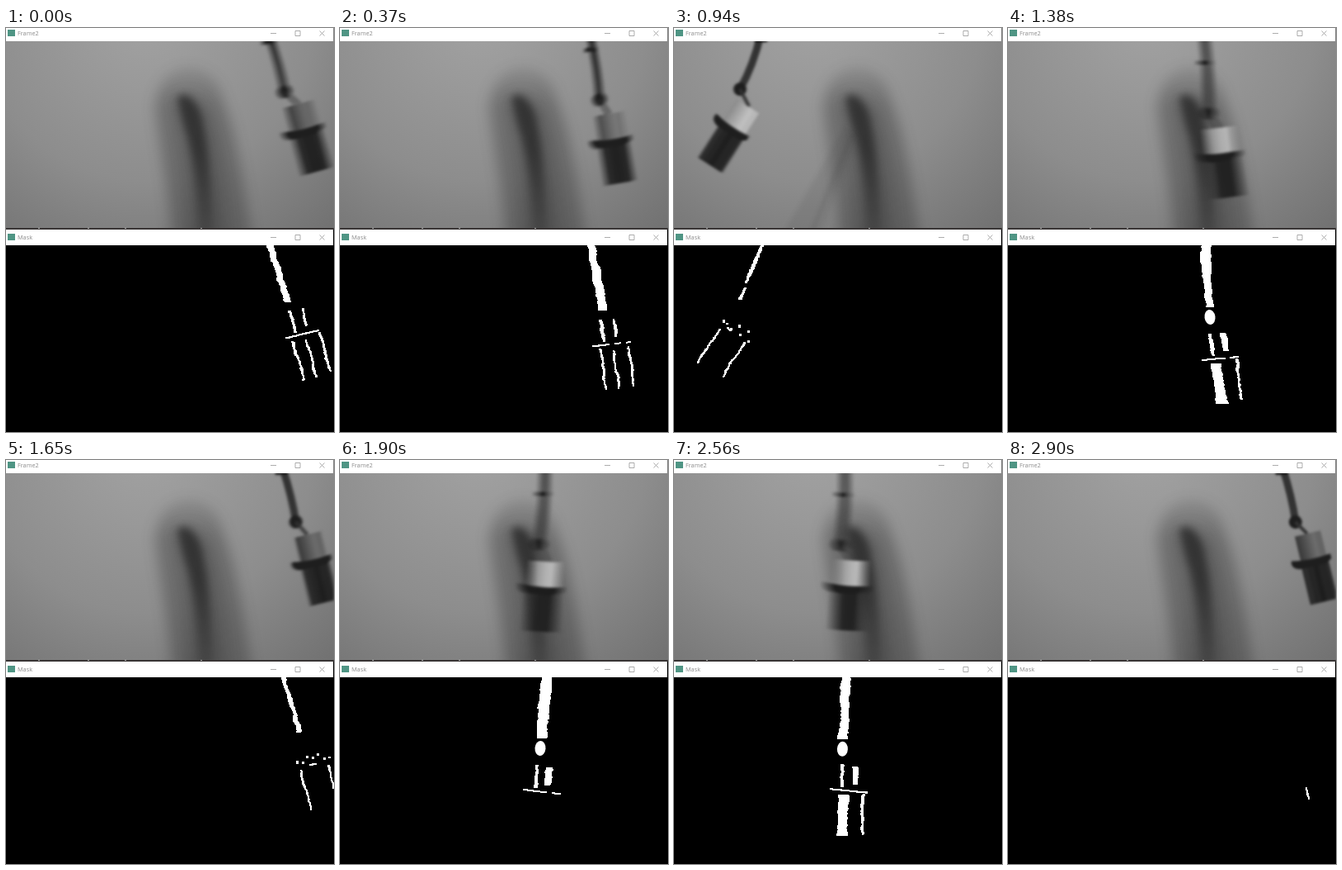
Animation, 398 px wide and 489 px high, one loop 2960 ms. Source, as an HTML page with a canvas:

```html
<!DOCTYPE html>
<html lang="en">
<head>
<meta charset="utf-8">
<title>Pendulum mask</title>
<style>
html, body { margin: 0; width: 398px; height: 489px; overflow: hidden; background: #000; }
canvas { position: absolute; left: 0; top: 0; }
.bar { position: absolute; left: 0; width: 397px; height: 16px; background: #fff; color: #8c8c8c;
  font: 7.3px/13px "Open Sans", "Noto Sans", sans-serif; }
.bar span { position: absolute; left: 14px; top: 0; }
.bar i { position: absolute; left: 2px; top: 2px; width: 9px; height: 8px; background: #4f9584; }
.bar svg { position: absolute; left: 318px; top: 0; fill: none; stroke: #999; stroke-width: .8; }
#lower { top: 244px; height: 19px; line-height: 19px; }
#lower i { top: 5px; }
#lower svg { top: 3px; }
</style>
</head>
<body>
<canvas id="stage" width="398" height="489"></canvas>
<div class="bar"><i></i><span>Frame2</span>
  <svg width="80" height="14"><path d="M3 6.5h7M33 3.5h6v6h-6zM62.5 3.5l6 6m0-6l-6 6"/></svg></div>
<div class="bar" id="lower"><i></i><span>Mask</span>
  <svg width="80" height="14"><path d="M3 6.5h7M33 3.5h6v6h-6zM62.5 3.5l6 6m0-6l-6 6"/></svg></div>
<script>
const W = 398, H = 489, LOOP = 2960, TOP = 16, BASE = 242, DROP = 247, MASK = 263;
const ctx = document.getElementById('stage').getContext('2d');
const layer = () => Object.assign(document.createElement('canvas'), { width: W, height: BASE }).getContext('2d');
const wall = layer(), sharp = layer(), smear = layer();
const clamp = (v, lo = 0, hi = 1) => Math.min(hi, Math.max(lo, v));

// Picture changes: [first, last, count], evenly spaced
const steps = [[0, 0, 1], [30, 540, 7], [600, 670, 2], [730, 940, 4], [1010, 1080, 2], [1140, 1380, 5],
  [1440, 1650, 5], [1710, 1900, 5], [1960, 2220, 6], [2280, 2760, 8], [2830, 2900, 2]]
  .flatMap(([a, b, n]) => Array.from({ length: n }, (_, i) => n > 1 ? a + (b - a) * i / (n - 1) : a));

// time, rod top x, knob x, knob y, body x, body y, tilt in degrees
const keys = [
  [-250, 225, 225, 104, 236, 119, 1],
  [0, 319, 338, 77, 354, 89, 15.5],
  [210, 335, 357, 74, 371, 86, 16],
  [540, 250, 246, 102, 254, 119, -2],
  [670, 196, 181, 103, 190, 120, -16.8],
  [940, 105, 80, 74, 91, 92, -32.5],
  [1380, 238, 243, 103, 255, 118, 8],
  [1620, 336, 354, 74, 368, 86, 15],
  [1900, 249, 241, 102, 250, 120, -4.5],
  [2280, 113, 92, 74, 104, 94, -32],
  [2590, 225, 223, 104, 236, 119, 1],
  [2900, 333, 349, 75, 363, 86, 13.6],
  [3220, 225, 223, 104, 236, 119, 1]
];

function slope(i, c) {
  const a = keys[Math.max(0, i - 1)], b = keys[Math.min(keys.length - 1, i + 1)];
  return 1.35 * (b[c] - a[c]) / (b[0] - a[0]);
}

function pose(t) {
  let i = 0;
  while (i < keys.length - 2 && t >= keys[i + 1][0]) i++;
  const p = keys[i], q = keys[i + 1], d = q[0] - p[0], k = (t - p[0]) / d, k2 = k * k, k3 = k2 * k;
  const at = c => (2 * k3 - 3 * k2 + 1) * p[c] + (k3 - 2 * k2 + k) * d * slope(i, c)
    + (3 * k2 - 2 * k3) * q[c] + (k3 - k2) * d * slope(i + 1, c);
  return { rx: at(1), kx: at(2), ky: at(3), bx: at(4), by: at(5), a: at(6) * Math.PI / 180 };
}

// Adds [offset, colour] stops to a gradient
function shade(g, ...stops) {
  for (const [o, c] of stops) g.addColorStop(o, c);
  return g;
}

function paintWall() {
  wall.fillStyle = shade(wall.createRadialGradient(170, -20, 10, 170, -20, 400),
    [0, '#a2a2a2'], [.5, '#8d8d8d'], [.85, '#727272'], [1, '#686868']);
  wall.fillRect(0, 0, W, BASE);
  wall.filter = 'blur(8px)';
  wall.fillStyle = shade(wall.createLinearGradient(0, 45, 0, BASE),
    [0, 'rgba(35,35,35,.12)'], [.25, 'rgba(35,35,35,.32)'], [1, 'rgba(35,35,35,.32)']);
  wall.fill(new Path2D('M181 98C182 36 252 34 263 86C280 130 288 180 300 270H202C198 200 186 140 181 98Z'));
  wall.fillStyle = 'rgba(35,35,35,.24)';
  wall.fill(new Path2D('M202 90Q222 66 244 98Q264 150 270 270H222Q222 150 202 90Z'));
  wall.filter = 'blur(5px)';
  wall.fillStyle = shade(wall.createLinearGradient(0, 75, 0, BASE),
    [0, 'rgba(25,25,25,.62)'], [.45, 'rgba(25,25,25,.58)'], [1, 'rgba(25,25,25,.22)']);
  wall.fill(new Path2D('M208 84Q220 74 234 98Q248 135 252 262H234Q232 160 216 118Z'));
  wall.filter = 'none';
}

function legs(alpha) {
  ctx.save();
  ctx.filter = 'blur(2.5px)';
  ctx.globalAlpha = alpha;
  ctx.fillStyle = 'rgba(45,45,45,.09)';
  ctx.fill(new Path2D('M208 118L132 250H178L222 135Z'));
  ctx.strokeStyle = 'rgba(40,40,40,.13)';
  ctx.lineWidth = 4;
  ctx.stroke(new Path2D('M216 128L166 250'));
  ctx.restore();
}

function pendulum(c, p) {
  c.clearRect(0, 0, W, BASE);
  c.strokeStyle = '#2c2c2c';
  c.lineWidth = 9;
  c.beginPath();
  c.moveTo(p.rx, 8);
  c.quadraticCurveTo((p.rx + p.kx) / 2 + 4, (TOP + p.ky) / 2, p.kx, p.ky);
  c.stroke();
  const my = TOP + (p.ky - 76) * .95, mx = p.rx + (p.kx - p.rx) * (my - TOP) / (p.ky - TOP);
  c.fillStyle = '#1a1a1a';
  c.fillRect(mx - 8, my - 2, 15, 5);
  c.beginPath();
  c.ellipse(p.kx, p.ky, 8, 8, -p.a, 0, 7);
  c.fill();
  c.lineWidth = 4;
  c.beginPath();
  c.moveTo(p.kx, p.ky);
  c.lineTo(p.bx, p.by + 3);
  c.stroke();

  c.save();
  c.translate(p.bx, p.by);
  c.rotate(-p.a);
  const light = 90 + 85 * clamp((340 - p.bx) / 90);
  const tone = v => `rgb(${v},${v},${v})`;
  c.fillStyle = shade(c.createLinearGradient(-16, 0, 16, 0),
    [0, tone(light - 40)], [.65, tone(light + 12)], [1, tone(light + 5)]);
  c.fillRect(-16, 3, 32, 32);
  c.fillStyle = shade(c.createLinearGradient(-17, 0, 17, 0),
    [0, '#2a2a2a'], [.5, '#1a1a1a'], [1, '#262626']);
  c.fillRect(-17, 38, 34, 50);
  c.fillStyle = '#161616';
  c.beginPath();
  c.moveTo(-27, 31);
  c.quadraticCurveTo(-8, 36, 21, 33);
  c.lineTo(21, 39);
  c.lineTo(14, 43);
  c.lineTo(-19, 43);
  c.quadraticCurveTo(-30, 40, -27, 31);
  c.fill();
  c.restore();
}

function paintFrame(t, p) {
  ctx.drawImage(wall.canvas, 0, 0);
  const far = clamp((150 - p.bx) / 45);
  if (far) legs(far);
  smear.globalCompositeOperation = 'source-over';
  smear.globalAlpha = 1;
  smear.clearRect(0, 0, W, BASE);
  smear.globalCompositeOperation = 'lighter';
  const n = 7;
  smear.globalAlpha = 1 / n;
  for (let i = 0; i < n; i++) {
    pendulum(sharp, pose(t + (i / (n - 1) - .5) * 24));
    smear.drawImage(sharp.canvas, 0, 0);
  }
  ctx.filter = 'blur(1.6px)';
  ctx.drawImage(smear.canvas, 0, 0);
  ctx.filter = 'none';
  ctx.fillStyle = '#383434';
  ctx.fillRect(0, BASE, W, 2);
  ctx.fillStyle = '#aaa';
  for (const x of [39, 99, 144, 236]) ctx.fillRect(x, BASE, 2, 1);
}

function paintMask(t, p) {
  let seed = Math.round(t) + 11;
  const rnd = () => (seed = (seed * 16807 + 7) % 2147483647) / 2147483647;
  const move = pose(t + 30).bx - pose(t - 30).bx;
  const s = clamp(Math.abs(move) / 27), fast = clamp((s - .9) / .1);

  // Wavering stroke, broken into short runs
  function streak(x0, y0, x1, y1, w, keep) {
    const n = Math.ceil(Math.hypot(x1 - x0, y1 - y0));
    let on = true, shift = 0, grow = 0;
    for (let i = 0; i <= n; i++) {
      if (i % 7 === 0) on = rnd() < keep;
      shift = clamp(shift + (rnd() - .5) * 1.2, -1.2, 1.2);
      grow = clamp(grow + (rnd() - .5) * 1.4, -w / 4, w / 4);
      if (!on) continue;
      const x = x0 + (x1 - x0) * i / n, y = y0 + (y1 - y0) * i / n + DROP;
      const wide = Math.max(1, Math.round(w + grow));
      ctx.fillRect(Math.round(x - wide / 2 + shift), Math.round(y), wide, 2);
    }
  }
  const cos = Math.cos(p.a), sin = Math.sin(p.a);
  const at = (u, v) => [p.bx + u * cos + v * sin, p.by + v * cos - u * sin];
  const local = (u0, v0, u1, v1, w, keep) => streak(...at(u0, v0), ...at(u1, v1), w, keep);

  ctx.fillStyle = '#000';
  ctx.fillRect(0, MASK, W, H - MASK);
  ctx.fillStyle = '#fff';
  const end = p.ky + 6 - 20 * fast;
  streak(p.rx + 2, TOP, p.rx + 2 + (p.kx - p.rx) * (end - TOP) / (p.ky - TOP), end, 2 + 9 * s, s * 4);

  if (fast) {
    ctx.beginPath();
    ctx.ellipse(p.kx + 2, p.ky + DROP, 6.5, 9, -p.a, 0, 7);
    ctx.fill();
  }
  if (s > .5) {
    local(-11, 3, -11, 29, 4, 1);
    local(5, 5, 5, 25, 3 + 5 * fast, 1);
  } else if (s > .15) {
    for (let i = 0; i < 7; i++) {
      const [x, y] = at(-20 + i * 6.5, 22 + rnd() * 12);
      ctx.fillRect(Math.round(x), Math.round(y) + DROP, 3, 2 + Math.round(rnd() * 3));
    }
  }
  local(-24, 33, 20, 35, 2, s * .9);

  // The body blends into the shadow behind it
  const low = at(0, 88)[0];
  if (Math.abs(low - 240) > 18) {
    const tail = move > 0 ? -1 : 1, w = 2 + s + 10 * fast, keep = .3 + s * 7;
    const u = tail * (17 - w * .7 * fast);
    local(u, 40, u, 88, w, s < .03 && tail > 0 ? 0 : keep);
    local(-tail * 17, 38, -tail * 17, 86, 2 + s, s < .03 && tail < 0 ? 0 : keep);
    if (s > .5 && fast < .5) local(-1, 42, -1, 88, 2 + s, 1);
  }
}

paintWall();
let shown = -1;
function tick() {
  const now = performance.now() % LOOP;
  let i = steps.length - 1;
  while (i > 0 && steps[i] > now + .01) i--;
  if (i !== shown) {
    shown = i;
    const t = steps[i], p = pose(t);
    paintMask(t, p);
    paintFrame(t, p);
  }
  requestAnimationFrame(tick);
}
tick();
</script>
</body>
</html>
```
